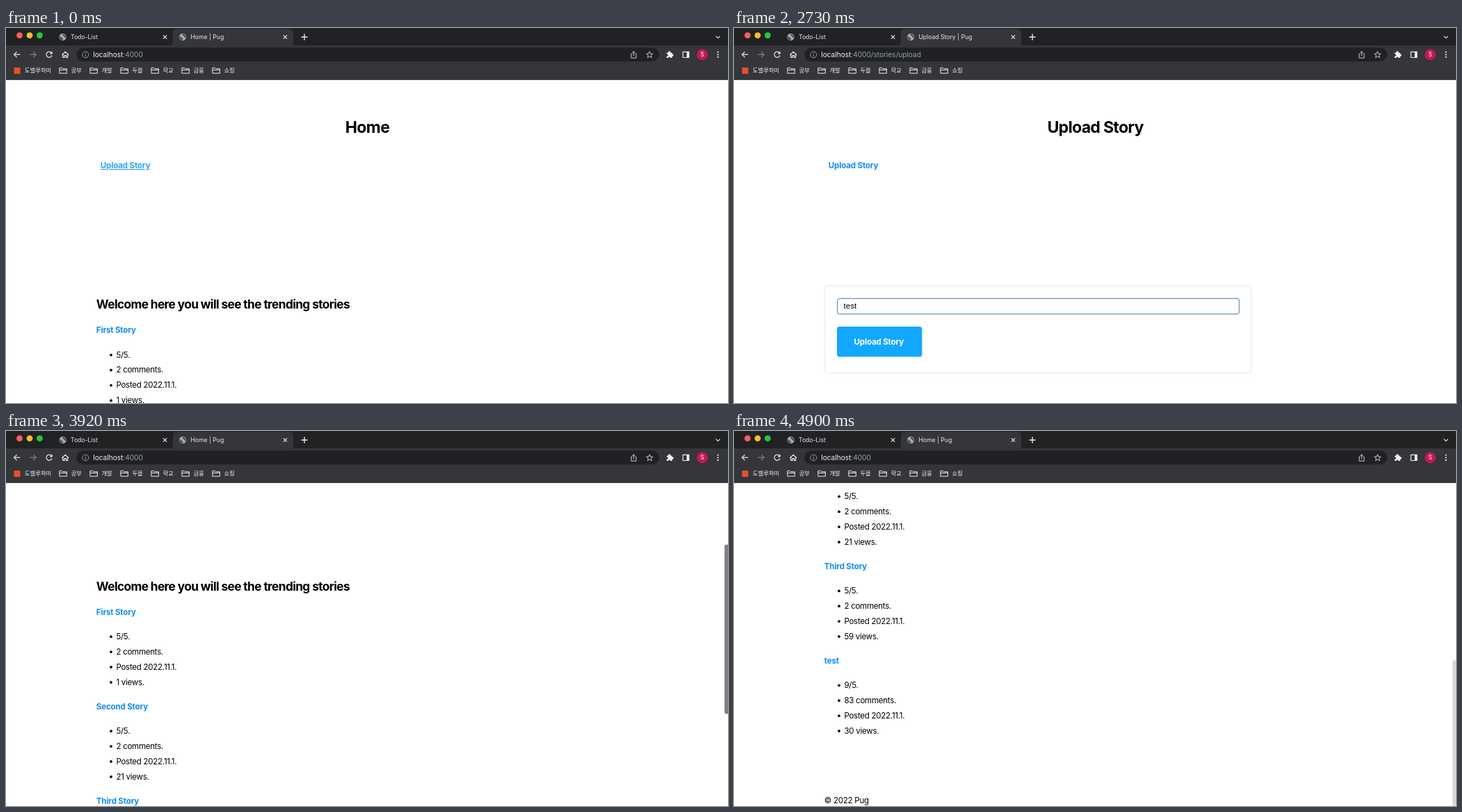
Write an HTML page that moves like this. It is 1038x540 px and loops after 4.97 s.

```html
<!DOCTYPE html>
<html lang="en">
<head>
<meta charset="utf-8">
<title>Story board</title>
<style>
html, body { margin: 0; width: 100%; height: 100%; overflow: hidden; background: #fff; }
svg { display: block; width: 1038px; height: 540px; font-family: Inter, "Noto Sans CJK KR", "Noto Sans CJK", sans-serif; }
.h1 { font-size: 23.07px; font-weight: 700; letter-spacing: -.03em; text-anchor: middle; }
.h2 { font-size: 17.3px; font-weight: 700; letter-spacing: -.036em; }
.body { font-size: 11.53px; letter-spacing: -.022em; }
.link { font-size: 11.53px; font-weight: 700; letter-spacing: -.012em; fill: #118bee; }
.hover { fill: #2ba2f2; text-decoration: underline; }
.field { font: 11.53px "Liberation Sans", Arial, sans-serif; }
.tab { font-size: 8.65px; fill: #e8eaed; }
.mark { font-size: 8.4px; fill: #f1f3f4; }
.url { font-size: 10.1px; fill: #9aa0a6; }
.icon { fill: none; stroke: #e8eaed; stroke-width: 1.2; }
</style>
</head>
<body>
<svg viewBox="0 0 1038 540">
  <defs>
    <g id="globe">
      <circle r="5" fill="#a9adb2"/>
      <path d="M-4.4-1.2Q-2-.8-1.2.8T.6 2.4Q.4 4-.8 4.6Q-4.6 3.6-4.4-1.2M.2-4.6Q-1-2.2.8-1.8T2.2.4Q3.6.2 4.4 1.2Q5-3 .2-4.6" fill="#45474b"/>
    </g>
    <path id="close" class="icon" d="M-2.6-2.6 2.6 2.6M2.6-2.6-2.6 2.6"/>
    <g id="folder" class="icon" style="stroke-width:1">
      <path d="M.5 1.2H4.2L5.4 2.5H11V9H.5ZM.5 4.2H11"/>
    </g>
  </defs>

  <rect width="1038" height="540" fill="#fff"/>
  <g id="page">
    <text id="heading" class="h1" x="519.5" y="151.4"></text>
    <text id="nav" class="link" x="135.8" y="202.1">Upload Story</text>
    <g id="home"><text class="h2" x="129.8" y="404.3">Welcome here you will see the trending stories</text></g>
    <g id="form">
      <rect x="130.5" y="371.5" width="613" height="125" rx="3.6" fill="#fff" stroke="#e9e9e9"
        style="filter:drop-shadow(1px 1px 2px #f4f4f4)"/>
      <rect x="148.5" y="389.5" width="578" height="23" rx="3.6" fill="#fff" stroke="#e7e7e7"/>
      <rect id="ring" x="148.7" y="389.6" width="577.6" height="22.2" rx="3.4" fill="none" stroke="#105ca6" stroke-width="1.5"/>
      <text id="value" class="field" x="157.6" y="404.3"></text>
      <rect id="caret" y="394" width="1" height="13"/>
      <rect id="button" x="148" y="430" width="122.4" height="43.4" rx="3.6"/>
      <text class="link" x="172.5" y="456.1" style="fill:#fff">Upload Story</text>
    </g>
  </g>
  <rect id="thumb" x="1033" width="6" height="244" rx="2.8" fill="#7f7f7f"/>

  <g id="chrome">
    <rect width="1038" height="26" fill="#202224"/>
    <path d="M234 26Q240 26 240 20V7Q240 1 246 1H407Q413 1 413 7V20Q413 26 419 26Z" fill="#35363a"/>
    <rect y="25" width="1038" height="50" fill="#35363a"/>
    <rect y="74" width="1038" height="1" fill="#48494d"/>
    <circle cx="19.5" cy="10.6" r="4.4" fill="#ff5f57"/>
    <circle cx="34" cy="10.6" r="4.4" fill="#febc2e"/>
    <circle cx="48.4" cy="10.6" r="4.4" fill="#28c840"/>
    <use href="#globe" x="81.6" y="13.1"/>
    <use href="#globe" x="254" y="13.1"/>
    <text class="tab" x="93" y="16.2">Todo-List</text>
    <text id="title" class="tab" x="265.4" y="16.2"></text>
    <use href="#close" x="228.6" y="13"/>
    <use href="#close" x="401.4" y="13"/>
    <path class="icon" d="M424.5 13H433.5M429 8.5V17.5" style="stroke-width:1.4"/>
    <path class="icon" d="M1020.5 11.6 1023.5 14.4 1026.5 11.6"/>

    <path class="icon" d="M20.3 38.2H11.6M15.6 34.2 11.6 38.2 15.6 42.2"/>
    <path class="icon" d="M34.4 38.2H43.1M39.1 34.2 43.1 38.2 39.1 42.2" style="stroke:#808387"/>
    <g id="reload">
      <path class="icon" d="M65.4 35.8A4.1 4.1 0 1 0 66 39.5"/>
      <path d="M66.7 33.6V37.6H62.7Z" fill="#e8eaed"/>
    </g>
    <use id="stop" href="#close" x="62" y="38.2"/>
    <path class="icon" d="M80.4 38.7 85.2 34.2 90 38.7M81.8 37.8V42.4H84V39.6H86.4V42.4H88.6V37.8"/>
    <rect x="101" y="28.2" width="838" height="20" rx="10" fill="#202124"/>
    <circle class="icon" cx="114.4" cy="38.4" r="4.4" style="stroke:#9aa0a6;stroke-width:1"/>
    <path class="icon" d="M114.4 37.8V41M114.4 35.8V36.8" style="stroke:#9aa0a6;stroke-width:1"/>
    <text class="url" x="125.2" y="41.9"><tspan fill="#f1f3f4">localhost</tspan><tspan id="path"></tspan></text>
    <g class="icon" style="stroke:#c6c9cd;stroke-width:1">
      <path d="M900.5 37H898.9V43.2H906V37H904.4M902.4 40.5V33.8M900.3 35.8 902.4 33.7 904.5 35.8"/>
      <path id="star"/>
    </g>
    <path d="M949.8 35.4H952.2A1.6 1.6 0 1 1 955.2 35.4H957.6V37.6A1.6 1.6 0 1 1 957.6 40.6V43H955.2A1.5 1.5 0 1 0 952.2 43H949.8V40.5A1.5 1.5 0 1 0 949.8 37.7Z" fill="#f1f3f4"/>
    <path class="icon" d="M973.2 34.3H981.8V42.5H973.2Z"/>
    <rect x="978.6" y="34" width="3.4" height="8.8" fill="#f1f3f4"/>
    <circle cx="1001" cy="38.3" r="8" fill="#c2185b"/>
    <text x="1001" y="41.4" font-size="8.6" fill="#fff" text-anchor="middle">S</text>
    <g fill="#e8eaed">
      <circle cx="1023.5" cy="34.7" r="1.1"/><circle cx="1023.5" cy="38.3" r="1.1"/><circle cx="1023.5" cy="41.9" r="1.1"/>
    </g>
    <rect x="11.5" y="57" width="9" height="9" fill="#e4502a"/>
    <text class="mark" x="26.8" y="64.2">도벨루하미</text>
  </g>
</svg>
<script>
const $ = id => document.getElementById(id);
const svgNS = 'http://www.w3.org/2000/svg';

function add(parent, tag, attrs, text = '') {
  const el = document.createElementNS(svgNS, tag);
  for (const key in attrs) el.setAttribute(key, attrs[key]);
  el.textContent = text;
  parent.append(el);
}

['공부', '개발', '두믈', '학교', '금융', '쇼핑'].forEach((label, i) => {
  add($('chrome'), 'use', { href: '#folder', x: 76.4 + i * 44, y: 56.2 });
  add($('chrome'), 'text', { class: 'mark', x: 93.4 + i * 44, y: 64.2 }, label);
});

const starPoints = Array.from({ length: 10 }, (_, i) => {
  const r = i % 2 ? 2.1 : 5, a = i * Math.PI / 5;
  return `${925.3 + r * Math.sin(a)} ${38.7 - r * Math.cos(a)}`;
});
$('star').setAttribute('d', `M${starPoints.join('L')}Z`);

const stories = [
  ['First Story', 5, 2, 1],
  ['Second Story', 5, 2, 21],
  ['Third Story', 5, 2, 59],
  ['test', 9, 83, 30]
];
stories.forEach(([name, rating, comments, views], i) => {
  const top = 435 + i * 136;
  add($('home'), 'text', { class: 'link', x: 129.8, y: top + 4.2 }, name);
  const lines = [`${rating}/5.`, `${comments} comments.`, 'Posted 2022.11.1.', `${views} views.`];
  lines.forEach((line, j) => {
    const y = top + 35.3 + j * 21.9;
    add($('home'), 'circle', { cx: 151, cy: y + .5, r: 1.9 });
    add($('home'), 'text', { class: 'body', x: 158.4, y: y + 4.2 }, line);
  });
});
add($('home'), 'text', { class: 'body', x: 129.8, y: 1048.4 }, '© 2022 Pug');

const LOOP = 4970, STEP = 70, SCROLL_END = 512.5;
const between = (t, a, b) => t >= a && t < b;
const progress = (t, a, b) => Math.min(1, Math.max(0, (t - a) / (b - a)));
const smooth = u => u * u * (3 - 2 * u);
const easeOut = u => 1 - (1 - u) ** 2;
const show = (id, on) => $(id).setAttribute('opacity', Number(on));

// Scroll down, rubber-band past the end, then spring back.
const scrollAt = t =>
  518 * smooth(progress(t, 3640, 4200) ** 1.36) +
  5 * easeOut(progress(t, 4200, 4480)) -
  10.5 * easeOut(progress(t, 4620, 4900));

const keyTimes = [1470, 1750, 1960, 2170];

function draw(t) {
  const upload = between(t, 350, 3010);
  const name = upload ? 'Upload Story' : 'Home';
  $('heading').textContent = name;
  $('title').textContent = `${name} | Pug`;
  $('path').textContent = upload ? ':4000/stories/upload' : ':4000';
  $('nav').setAttribute('class', t < 350 ? 'link hover' : 'link');
  show('home', !upload);
  show('form', upload);

  const loading = between(t, 280, 560) || between(t, 2940, 3220);
  show('reload', !loading);
  show('stop', loading);

  const typed = 'test'.slice(0, keyTimes.filter(k => t >= k).length);
  const value = $('value');
  value.textContent = typed || 'Title';
  value.setAttribute('fill', typed ? '#000' : '#757575');
  $('caret').setAttribute('x', 157.6 + (typed ? value.getComputedTextLength() : 0));
  show('caret', between(t, 1190, 2730));
  show('ring', between(t, 1190, 2730) ? 1 : between(t, 2730, 2800) ? .5 : 0);
  $('button').setAttribute('fill', t >= 2170 ? '#14a7ff' : '#118bee');

  const scroll = scrollAt(t);
  $('page').setAttribute('transform', `translate(0 ${-scroll})`);
  $('thumb').setAttribute('y', 77.3 + Math.min(scroll, SCROLL_END) * .493);
  show('thumb', t < 3710 ? 0 : 1 - .7 * progress(t, 4620, 4900));
}

function tick(now) {
  draw(Math.floor(now % LOOP / STEP) * STEP);
  requestAnimationFrame(tick);
}
draw(0);
requestAnimationFrame(tick);
</script>
</body>
</html>
```
